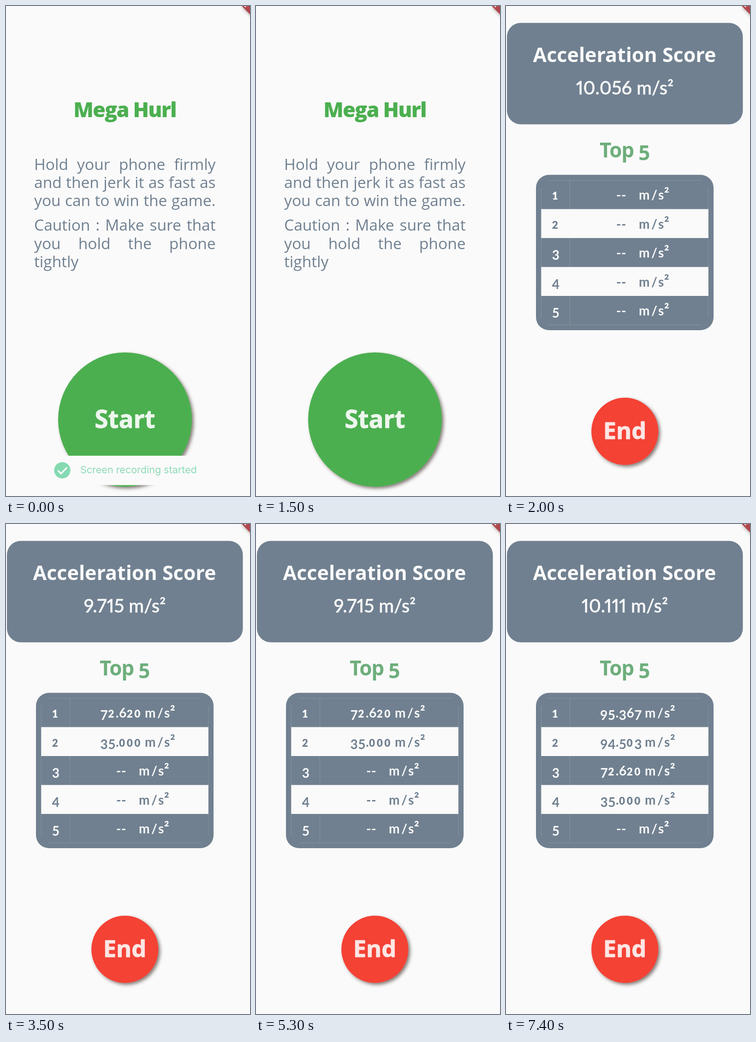
Animation of 529x1058 px, one loop 8 s. Source, as an HTML page:

```html
<!DOCTYPE html>
<html lang="en">
<head>
<meta charset="utf-8">
<title>Throw score</title>
<style>
  html, body { margin: 0; width: 100%; height: 100%; overflow: hidden; background: #fafafa; }
  svg { display: block; width: 100%; height: 100%; }
  text, .rules { font-family: "Open Sans", "Noto Sans", sans-serif; }
  foreignObject { overflow: visible; }
  .mid { text-anchor: middle; }
  .rules { color: #708090; font-size: 33.5px; font-weight: 500; line-height: 39.3px; }
  .rules p { margin: 0 0 14px; }
  .rules span { display: block; white-space: nowrap; text-align: justify; text-align-last: justify; word-spacing: -2px; }
  .rules .last { text-align-last: left; }
  .button { font-weight: 700; stroke-width: 1; stroke-linejoin: round; }
  .score { font: 500 39.8px Lato, sans-serif; font-variant-numeric: proportional-nums; stroke-width: .5; }
  .cell { font: 700 28px Lato, sans-serif; letter-spacing: .5px; white-space: pre; }
</style>
</head>
<body>
<svg viewBox="0 0 529 1058">
  <defs>
    <filter id="shadow" x="-20%" y="-20%" width="140%" height="140%">
      <feDropShadow dx="4" dy="4" stdDeviation="3.6" flood-color="#3a2f28" flood-opacity=".6"/>
    </filter>
  </defs>
  <rect width="529" height="1058" fill="#fafafa"/>

  <g id="intro">
    <text class="mid" x="257.5" y="240" font-size="45" font-weight="800" letter-spacing="-1.8" fill="#4caf50">Mega Hurl</text>
    <foreignObject x="61" y="321.5" width="393.5" height="280">
      <div class="rules">
        <p><span>Hold your phone firmly</span><span>and then jerk it as fast as</span><span>you can to win the game.</span></p>
        <p><span>Caution : Make sure that</span><span>you hold the phone</span><span class="last">tightly</span></p>
      </div>
    </foreignObject>
    <circle cx="258" cy="893" r="145" fill="#4caf50" filter="url(#shadow)"/>
    <text class="mid button" x="258" y="911" font-size="53" fill="#edf6ed" stroke="#edf6ed">Start</text>
    <g id="toast">
      <rect x="61" y="971" width="394" height="63.5" fill="#fafafa"/>
      <circle cx="122" cy="1002.5" r="17.6" fill="#85d9b1"/>
      <path d="M112.5 1003l6.7 6.7 13.3-13.6" fill="none" stroke="#fafafa" stroke-width="3.2"/>
      <text x="161" y="1009" font-size="21.5" style="font-family:Inter,sans-serif" fill="#8edab6">Screen recording started</text>
    </g>
  </g>

  <g id="board">
    <rect x="2" y="36.5" width="511.5" height="219" rx="30" fill="#708090"/>
    <text class="mid" x="257" y="121" font-size="43" font-weight="700" fill="#fafafa">Acceleration Score</text>
    <text class="mid score" id="score" x="257.5" y="191" fill="#fafafa" stroke="#fafafa"></text>
    <text x="203" y="327" font-size="44" font-weight="700" letter-spacing="-1.2" fill="#6dae7c">Top <tspan dy="6">5</tspan></text>
    <rect x="65" y="364.5" width="385" height="335.5" rx="28" fill="#708090"/>
    <path d="M92 376.5H424M92 688.5H424M76.5 392V673M438.5 392V673M138.5 376V688" fill="none" stroke="#8b98a5" stroke-width=".8"/>
    <g id="rows"></g>
    <circle cx="257.7" cy="918.3" r="72.6" fill="#f44336" filter="url(#shadow)"/>
    <text class="mid button" x="257.5" y="935" font-size="50.5" fill="#fde6e4" stroke="#fde6e4">End</text>
  </g>

  <path d="M508 -3h30v30z" fill="#b0464d" filter="url(#shadow)"/>
  <path d="M515 -1l4 4 2 -1 -3 -3zM521 -1l3 2v-2z" fill="#f6e9ea"/>
</svg>
<script>
  const $ = id => document.getElementById(id);
  const LOOP = 8000;
  const boards = [
    { at: 2000, score: "10.056", top: [] },
    { at: 3500, score: "9.715", top: ["72.620", "35.000"] },
    { at: 6500, score: "10.111", top: ["95.367", "94.503", "72.620", "35.000"] }
  ];
  const unit = 'm<tspan dx="3">/</tspan><tspan dx="2.5">s</tspan><tspan font-size="33">²</tspan>';

  // Old-style figures: 0-2 at x-height, 3 4 5 7 9 hang below the baseline.
  function figures(text) {
    let drop = 0;
    return [...text].map(c => {
      const next = "34579".includes(c) ? 5 : 0;
      const small = "012".includes(c) ? ' font-size="22.5" font-weight="900" letter-spacing="3.6"' : "";
      const span = `<tspan dy="${next - drop}"${small}>${c}</tspan>`;
      drop = next;
      return span;
    }).join("");
  }

  function row(value, i) {
    const y = 376 + i * 62.5, base = y + 42, light = i % 2;
    const cell = (x, anchor, body) =>
      `<text class="cell" x="${x}" y="${base}" text-anchor="${anchor}">${body}</text>`;
    return (light ? `<rect x="76.3" y="${y}" width="362.5" height="62.5" fill="#fafafa"/>` : "") +
      `<g fill="${light ? "#708090" : "#fafafa"}">` +
      cell(108, "middle", figures(String(i + 1))) +
      cell(value ? 295 : 261, "end", value ? figures(value) : "--") +
      cell(value ? 301 : 288, "start", unit) + "</g>";
  }

  let shown;
  function draw(t) {
    const board = boards.filter(b => t >= b.at).pop();
    $("intro").style.display = board ? "none" : "";
    $("board").style.display = board ? "" : "none";
    $("toast").style.display = t < 500 ? "" : "none";
    if (board && board !== shown) {
      $("score").textContent = board.score + " m/s²";
      $("rows").innerHTML = [0, 1, 2, 3, 4].map(i => row(board.top[i], i)).join("");
      shown = board;
    }
  }

  const start = performance.now();
  function tick() {
    draw((performance.now() - start) % LOOP);
    requestAnimationFrame(tick);
  }
  tick();
</script>
</body>
</html>
```
